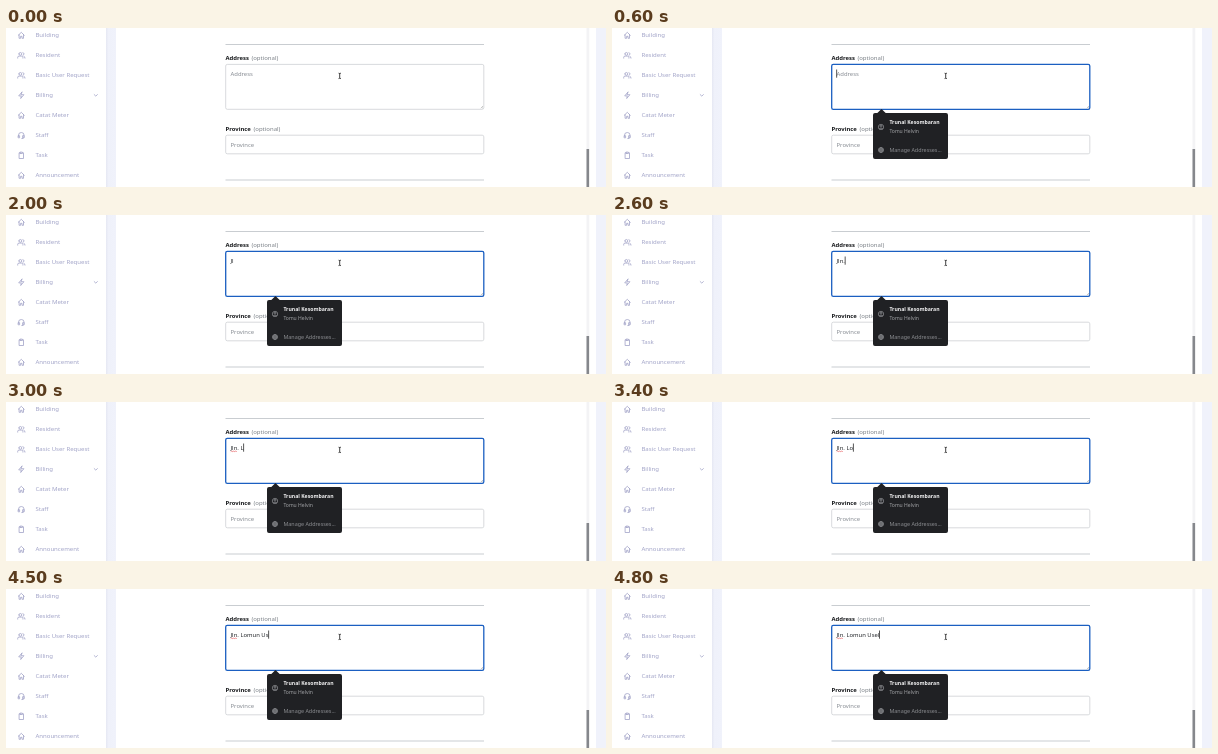
Write an HTML page that moves like this. It is 600 px wide and 159 px high and loops after 5 s.

```html
<!DOCTYPE html>
<html lang="en">
<head>
<meta charset="utf-8">
<title>Address form</title>
<style>
  html, body { margin: 0; width: 100%; height: 100%; overflow: hidden; background: #fff; }
  svg { display: block; width: 100%; height: 100%; }
  text { font: 5.9px "Noto Sans", "Open Sans", sans-serif; white-space: pre; }
  .menu text { font-size: 6.05px; fill: #a2a4c8; }
  .menu path { fill: none; stroke: #a2a4c8; stroke-width: .8; stroke-linecap: round; stroke-linejoin: round; }
  .label { font-weight: 600; fill: #17191c; }
  .opt { font-size: 6px; fill: #7b8087; }
  .hint { fill: #868b92; }
  .box { fill: #fff; stroke: #ced1d5; stroke-width: .8; }
  .rule { stroke: #bcc0c6; stroke-width: .8; }
</style>
</head>
<body>
<svg viewBox="0 0 600 159" preserveAspectRatio="none">
  <defs>
    <linearGradient id="edge">
      <stop offset="0" stop-color="#e6e8f3"/>
      <stop offset=".25" stop-color="#eff1fa"/>
      <stop offset="1" stop-color="#f0f2fb"/>
    </linearGradient>
  </defs>
  <rect width="600" height="159" fill="#fff"/>
  <rect x="100" width="10" height="159" fill="url(#edge)"/>
  <rect x="590" width="10" height="159" fill="#f0f2fb"/>
  <rect x="580.5" width="2.8" height="159" fill="#f3f3f5"/>
  <rect x="580.5" y="121" width="2.6" height="38" fill="#85878c"/>

  <g class="menu" id="menu"></g>

  <path class="rule" d="M219.5 16.5H478M219.5 152H478"/>
  <text class="label" x="219.5" y="32.3">Address</text>
  <text class="opt" x="245.4" y="32.3">(optional)</text>
  <rect class="box" id="area" x="219.7" y="36.4" width="258.1" height="44.9" rx="1.6"/>
  <path d="M474.8 80.2l2.2-2.2M476.2 80.2l.8-.8" stroke="#777" stroke-width=".4"/>
  <text class="hint" id="hint" x="224.5" y="48">Address</text>
  <text id="typed" x="224.5" y="48" fill="#23262a"></text>
  <path id="squiggle" d="M224.8 49.7l1 -.7l1 .7l1 -.7l1 .7l1 -.7l1 .7" fill="none" stroke="#e5484d" stroke-width=".6"/>
  <rect id="caret" y="41.5" width=".7" height="8.2" fill="#111"/>

  <text class="label" x="219.5" y="103.1">Province</text>
  <text class="opt" x="247.5" y="103.1">(optional)</text>
  <rect class="box" x="219.7" y="107.2" width="258.1" height="18.6" rx="1.6"/>
  <text class="hint" x="224.5" y="118.8">Province</text>

  <g id="popup">
    <path d="M263 85H265.3L269.5 81L273.7 85H334Q336 85 336 87V129Q336 131 334 131H263Q261 131 261 129V87Q261 85 263 85Z" fill="#202124"/>
    <g fill="none" stroke="#a5a7aa" stroke-width=".6">
      <circle cx="269" cy="99" r="2.7"/>
      <circle cx="269" cy="98.2" r=".9"/>
      <path d="M267.2 100.9Q269 99.3 270.8 100.9"/>
      <circle cx="269" cy="122" r="2.5"/>
      <ellipse cx="269" cy="122" rx="1.1" ry="2.5"/>
      <path d="M266.6 121.2H271.4M266.6 122.8H271.4"/>
    </g>
    <text x="277.4" y="96.3" fill="#f4f4f5" style="font-size:5.15px;font-weight:600">Trunal Kesombaran</text>
    <text x="277.4" y="105" fill="#a2a4a7" style="font-size:5.05px">Tomu Helvin</text>
    <text x="277.4" y="124.1" fill="#8c8e92" style="font-size:5.4px">Manage Addresses...</text>
  </g>

  <path d="M332.6 45.2Q333.7 45.2 333.7 46V49.8Q333.7 50.6 332.6 50.6M334.8 45.2Q333.7 45.2 333.7 46M333.7 49.8Q333.7 50.6 334.8 50.6" fill="none" stroke="#111" stroke-width=".8"/>
</svg>
<script>
const $ = id => document.getElementById(id);

// Icons are drawn around their own centre.
const home = "M-3 0L0-3L3 0M-2.2-.6V3H-.7V1H.7V3H2.2V-.6";
const people = "M-2.4-1.4a1.4 1.4 0 1 0 2.8 0a1.4 1.4 0 1 0-2.8 0" +
  "M-3.6 2.8V2Q-3.6.8-2.2.8H.2Q1.6.8 1.6 2V2.8M1.6-2.7Q2.7-2.4 2.7-1.4T1.6-.1M2.6.9Q3.7 1.1 3.7 2.8";
const bolt = "M.6-3.2L-2.6.6H0L-.6 3.2L2.6-.6H0Z";
const headset = "M-2.8 1V0a2.8 2.8 0 0 1 5.6 0V1M-2.8.4H-1.7V2.5H-2.8ZM1.7.4H2.8V2.5H1.7ZM2.6 2.5Q2.4 3.4.5 3.3";
const clipboard = "M-1-2.5H-2.2V3.2H2.2V-2.5H1M-1-3.2H1V-1.8H-1Z";

const items = [
  ["Building", home], ["Resident", people], ["Basic User Request", people],
  ["Billing", bolt], ["Catat Meter", home], ["Staff", headset],
  ["Task", clipboard], ["Announcement", home]
];
$("menu").innerHTML = items.map(([name, icon], i) => {
  const y = 7.3 + 20 * i;
  return `<path transform="translate(15.3 ${y})" d="${icon}"/><text x="29.4" y="${y + 2.1}">${name}</text>`;
}).join("") + '<path d="M88.2 66.6L89.8 68.1L91.4 66.6"/>';

const LOOP = 5000, FOCUS = 600, BLINK = 400;
const phrase = "Jln. Lomun Usel";
const keys = [1200, 1600, 2200, 2600, 2800, 3000, 3400, 3500, 3600, 3800, 4000, 4300, 4500, 4600, 4800];

const show = (el, on) => el.setAttribute("visibility", on ? "visible" : "hidden");

function draw(t) {
  const focused = t >= FOCUS;
  const count = keys.filter(k => k <= t).length;
  const last = count ? keys[count - 1] : FOCUS;
  const typed = $("typed");

  typed.textContent = phrase.slice(0, count);
  show($("hint"), !count);
  show($("popup"), focused);
  show($("squiggle"), count > 4);
  show($("caret"), focused && t - last < BLINK);
  $("caret").setAttribute("x", 224.4 + (count ? typed.getComputedTextLength() : 0));
  $("area").style.stroke = focused ? "#1b5fc1" : "";
  $("area").style.strokeWidth = focused ? "1.3" : "";
}

const start = performance.now();
function tick() {
  draw((performance.now() - start) % LOOP);
  requestAnimationFrame(tick);
}
tick();
</script>
</body>
</html>
```
